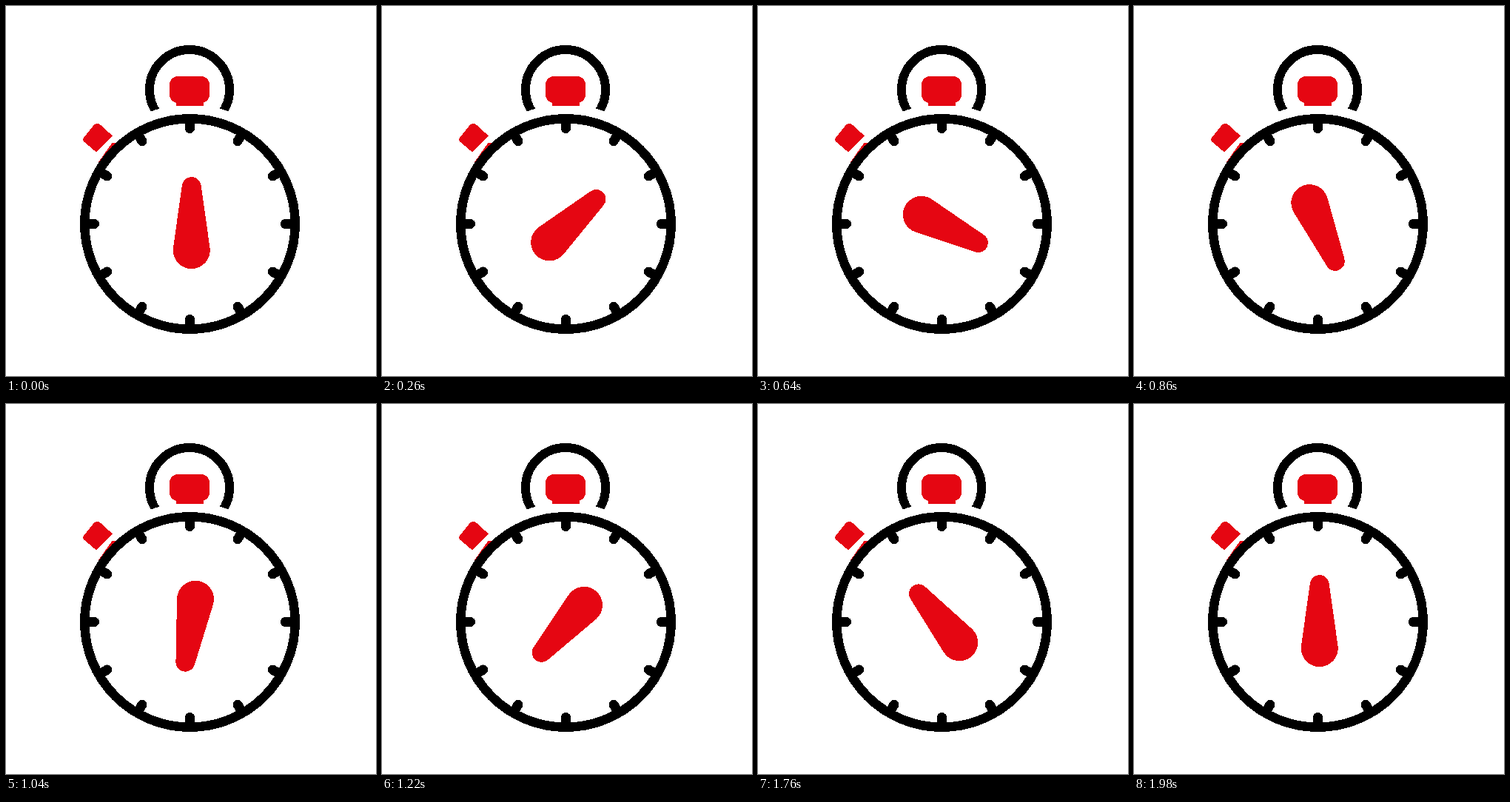
Write an HTML page that moves like this. It is 500 px wide and 500 px high and loops after 2000 ms.

```html
<!DOCTYPE html>
<html lang="en">
<head>
<meta charset="utf-8">
<title>Stopwatch</title>
<style>
  html, body { margin: 0; width: 100%; height: 100%; overflow: hidden; background: #fff; }
  svg { display: block; width: 100vw; height: 100vh; shape-rendering: crispEdges; }
  .red { fill: #e50612; }
  .line { fill: none; stroke: #000; }
</style>
</head>
<body>
<svg viewBox="0 0 500 500">
  <circle class="line" cx="248" cy="113" r="54" stroke-width="12"/>
  <circle cx="248.5" cy="294.5" r="161" fill="#fff"/>
  <g class="red">
    <rect x="221" y="95" width="54" height="36" rx="11.5"/>
    <rect x="230" y="125" width="37" height="10"/>
    <path d="M144 175.5L122 197.5L105.5 183.5Q102.8 180.5 105.5 177.5L118.5 161Q123 157 127.5 160.5Z"/>
    <path d="M150 185L143 185.5L138 192.5L124 212.5L131 212L152 190Z"/>
  </g>
  <circle class="line" cx="248.5" cy="294.5" r="142.25" stroke-width="12.5"/>
  <g id="ticks" class="line" transform="translate(248.5 294.5)" stroke-width="13" stroke-linecap="round"/>
  <path id="hand" class="red"/>
</svg>
<script>
  const LOOP = 2000, STEP = 20, LAST = LOOP / STEP - 1;
  const ticks = document.getElementById('ticks');
  const hand = document.getElementById('hand');

  for (let i = 0; i < 12; i++) {
    const tick = document.createElementNS('http://www.w3.org/2000/svg', 'path');
    tick.setAttribute('d', 'M0 -141V-129');
    tick.setAttribute('transform', `rotate(${i * 30})`);
    ticks.append(tick);
  }

  // Two circles on the vertical axis joined by their outer tangents.
  function taperedHand(tipY, tipR, baseY, baseR) {
    const sin = (baseR - tipR) / (baseY - tipY);
    const cos = Math.sqrt(1 - sin * sin);
    const tx = tipR * cos, ty = tipY - tipR * sin;
    const bx = baseR * cos, by = baseY - baseR * sin;
    return `M${-tx} ${ty}A${tipR} ${tipR} 0 0 1 ${tx} ${ty}` +
           `L${bx} ${by}A${baseR} ${baseR} 0 1 1 ${-bx} ${by}Z`;
  }
  hand.setAttribute('d', taperedHand(-52.6, 13, 33.4, 25));

  function draw(ms) {
    const step = Math.floor((ms % LOOP) / STEP);
    hand.setAttribute('transform', `translate(250.75 296.7) rotate(${step * 360 / LAST})`);
  }

  const start = performance.now();
  function tickFrame() {
    draw(Math.max(0, performance.now() - start));
    requestAnimationFrame(tickFrame);
  }
  tickFrame();
</script>
</body>
</html>
```
